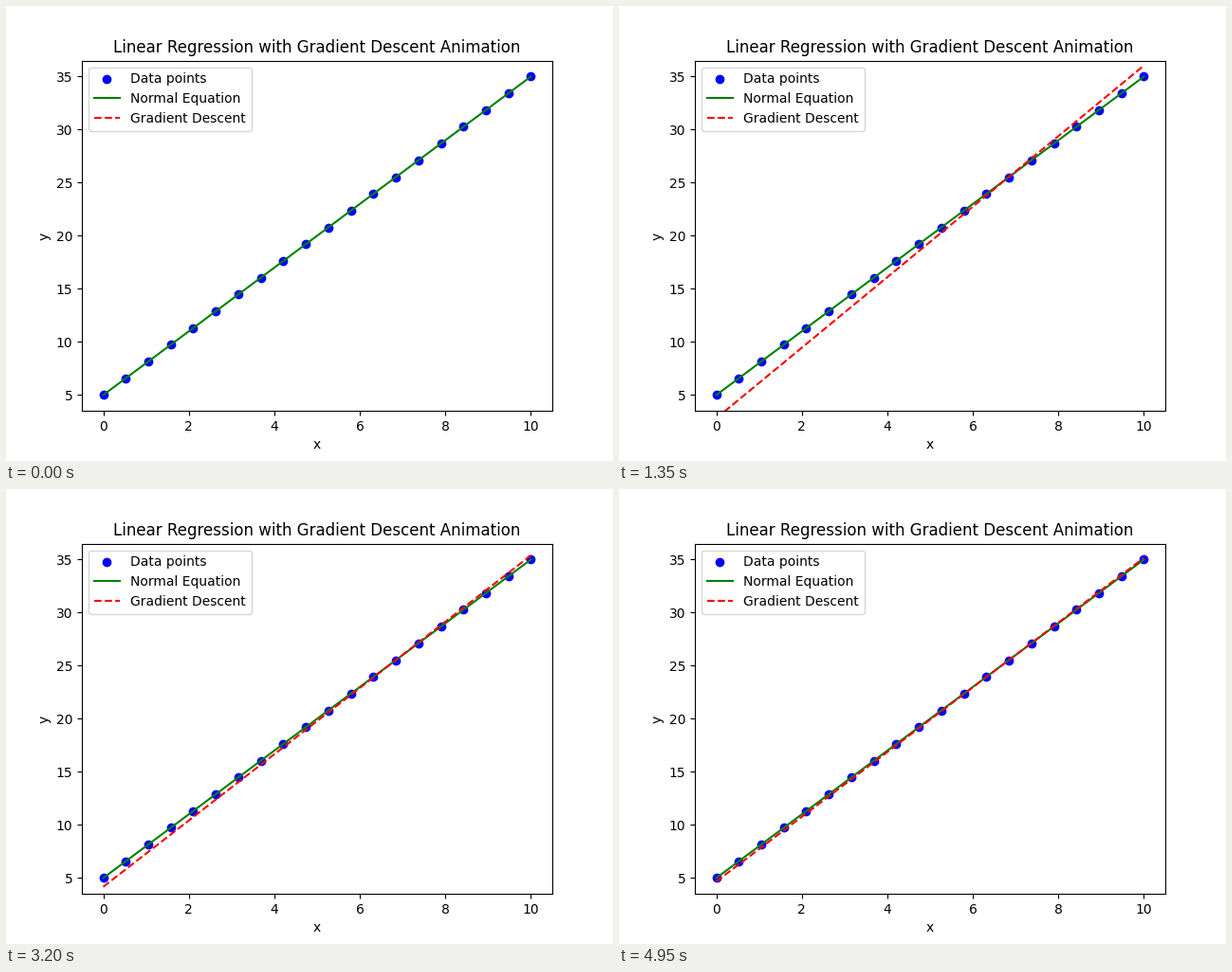
A matplotlib script for the animation above (5000 ms loop, 640 px wide and 480 px high).

```python
import numpy as np
import matplotlib.pyplot as plt
from matplotlib.animation import FuncAnimation

FRAMES = 100
INTERVAL = 50
STEPS_PER_FRAME = 10
RATE = 0.01

plt.rcParams["font.family"] = "DejaVu Sans"

x = np.linspace(0, 10, 20)
y = 5 + 3 * x
X = np.column_stack([np.ones_like(x), x])


def descend(theta, steps):
    for _ in range(steps):
        theta = theta - RATE * X.T @ (X @ theta - y) / len(x)
    return theta


# Parameters (intercept, slope) shown in each frame
history = [np.zeros(2)]
for _ in range(FRAMES - 1):
    history.append(descend(history[-1], STEPS_PER_FRAME))

best = np.linalg.solve(X.T @ X, X.T @ y)

fig, ax = plt.subplots(figsize=(6.4, 4.8), dpi=100)
ax.scatter(x, y, color="blue", label="Data points")
ax.plot(x, X @ best, color="green", label="Normal Equation")
fit_line, = ax.plot([], [], color="red", linestyle="--", label="Gradient Descent")
ax.set_xlim(-0.5, 10.5)
ax.set_ylim(3.5, 36.5)
ax.set_xlabel("x")
ax.set_ylabel("y")
ax.set_title("Linear Regression with Gradient Descent Animation")
ax.legend(loc="upper left")


def update(frame):
    fit_line.set_data(x, X @ history[frame])
    return fit_line,


anim = FuncAnimation(fig, update, frames=FRAMES, interval=INTERVAL,
                     repeat=True, repeat_delay=0, blit=False)
plt.show()
```
